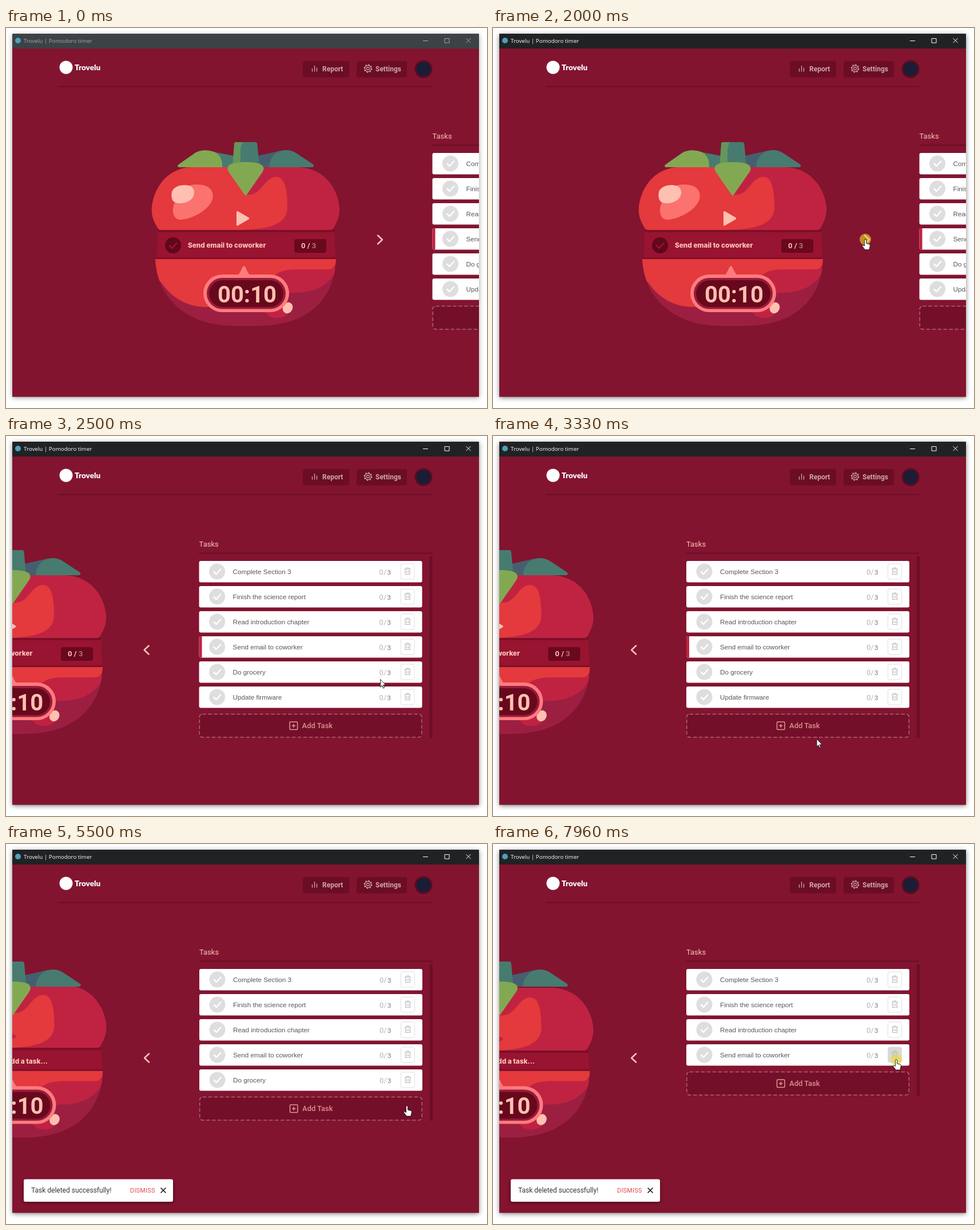
An HTML page for the animation above (8 s loop, 841x666 px).

```html
<!DOCTYPE html>
<html lang="en">
<head>
<meta charset="utf-8">
<title>Pomodoro timer</title>
<style>
  html, body { margin: 0; width: 100%; height: 100%; overflow: hidden; background: #fff; }
  svg { display: block; position: absolute; left: 0; top: 0; }
  text { font-family: Roboto, sans-serif; white-space: pre; }
  .line { fill: none; stroke-linecap: round; stroke-linejoin: round; }
  .dark { fill: #6b0d25; }
  .light { fill: #e4393d; }
  .mid { fill: #c02341; }
  .deep { fill: #9c1f42; }
  .green { fill: #82a952; }
  .teal { fill: #477b70; }
  .cream { fill: #ffc0b2; }
  .pink { fill: #ff7b7e; }
  .label { font-weight: 700; font-size: 12px; fill: #cda5a8; }
  .band { font: 800 11.8px Inter, sans-serif; fill: #ffc4b8; }
  .task { font: 11.7px "Liberation Sans", sans-serif; fill: #58585e; }
</style>
</head>
<body>
<svg width="841" height="666" viewBox="0 0 841 666">
  <defs>
    <clipPath id="page"><rect x="11" y="36" width="816" height="610"/></clipPath>
    <clipPath id="upperClip"><path id="upperShape" d="M271 354Q267 354 265 350C256 335 254 326 255 314C259 276 286 244 326 244H512C554 245 580 279 583 314C584 326 581 337 573 350Q571 354 567 354Z"/></clipPath>
    <clipPath id="lowerClip"><path d="M261 405H577C575 470 533 522 440 522H400C315 522 264 473 261 405Z"/></clipPath>
    <filter id="blur" x="-10%" y="-10%" width="120%" height="120%"><feGaussianBlur stdDeviation="4"/></filter>
    <filter id="soft" x="-10%" y="-40%" width="120%" height="200%"><feGaussianBlur stdDeviation="3"/></filter>
  </defs>

  <rect id="shadow" x="11" y="12" width="816" height="636" filter="url(#blur)"/>
  <rect x="11" y="10" width="816" height="636.5" fill="#821430"/>
  <rect id="bar" x="11" y="10" width="816" height="26"/>
  <circle cx="21" cy="22" r="5" fill="#4f9fb8"/>
  <g id="caption">
    <text x="31" y="26" style="font:9.8px 'Open Sans',sans-serif">Trovelu | Pomodoro timer</text>
    <path d="M729 22.5H738M767 18.5H775V26H767ZM804.500 18L812.500 26M812.500 18L804.500 26" fill="none"/>
  </g>

  <circle cx="105" cy="69" r="11.500" fill="#fff"/>
  <text x="120" y="74" fill="#fff" style="font:900 13.500px Lato,sans-serif">Trovelu</text>
  <rect class="dark" x="93" y="101.500" width="652" height="2"/>
  <rect class="dark" x="519" y="58" width="81" height="28.500" rx="4"/>
  <rect class="dark" x="613" y="58" width="88" height="28.500" rx="4"/>
  <path class="line" stroke="#cda5a8" stroke-width="1.300" d="M535.500 76V71.500M539.500 76V66.500M543.500 76V70"/>
  <g fill="none" stroke="#cda5a8" stroke-width="1.200">
    <circle cx="633" cy="71" r="5.400"/><circle cx="633" cy="71" r="2.400"/>
    <circle cx="633" cy="71" r="6.600" stroke-width="1.600" stroke-dasharray="2.600 2.580"/>
  </g>
  <text class="label" x="553" y="76">Report</text>
  <text class="label" x="646" y="76">Settings</text>
  <circle cx="730" cy="72" r="15.500" fill="#560d22"/>
  <circle cx="730" cy="72" r="12.300" fill="#1b1c35"/>

  <g clip-path="url(#page)">
    <g id="track">
      <path d="M264 346H574L575 382 577 412H261L265 382Z" fill="#981430"/>
      <g id="lower">
        <g clip-path="url(#lowerClip)">
          <rect class="deep" x="250" y="405" width="340" height="120"/>
          <path class="mid" d="M400 420H580C568 447 545 464 505 464H470L495 497C492 510 462 512 456 500L400 480Z"/>
          <path class="light" d="M255 405H577C577 417 573 423 563 423H505C478 424 466 432 460 450L400 489H350C318 489 291 474 272 447L255 430Z"/>
        </g>
        <rect x="262" y="402" width="314" height="3" fill="#7d0f29"/>
        <ellipse class="cream" cx="492.500" cy="490.500" rx="8.500" ry="10" transform="rotate(28 492.500 490.500)"/>
        <path class="pink" d="M404 435Q409 430 413 420Q416 414 419 420Q423 430 428 435Z"/>
        <rect class="pink" x="345" y="432" width="150" height="66" rx="33"/>
        <rect x="351" y="438" width="138" height="54.500" rx="27" fill="#981b3a"/>
        <rect x="355" y="442" width="130" height="47" rx="23.500" fill="#68081c"/>
        <text x="421.500" y="480.500" text-anchor="middle" class="cream" style="font-weight:700;font-size:40px">00:10</text>
      </g>
      <g id="upper">
        <rect x="265" y="352" width="309" height="6" fill="#7d0f29"/>
        <g clip-path="url(#upperClip)">
          <use href="#upperShape" class="mid"/>
          <path class="light" d="M250 240H418L419 292C448 296 450 261 473 261C490 261 492 292 492 314C492 346 456 354 400 354H250Z"/>
        </g>
        <path d="M298 297C303 278 326 272 343 275C360 278 366 291 359 305C350 321 328 333 307 336C293 337 290 323 293 311Z" fill="#fc726e"/>
        <path class="cream" d="M290 287C294 276 311 273 322 277C331 281 331 293 324 300C315 308 299 310 292 303Q288 297 290 287Z"/>
        <path id="play" d="M403 323Q403 320 406 321.500L424 332Q426.500 334 424 335.500L406 346Q403 347.500 403 345Z"/>
      </g>
      <g id="stem">
        <path class="teal" d="M362 217L398 224V244H362Z"/>
        <path class="green" d="M302 244Q298 242 302 239L332 218Q347 211 364 217Q379 224 378 244Z"/>
        <path d="M440 224L480 215V244H440Z" fill="#465f6e"/>
        <path class="teal" d="M460 244C461 228 471 213 492 214Q502 215 510 221L537 239Q540 242 536 244Z"/>
        <path class="teal" d="M402 200H436Q439 200 439.500 204L443 244H396L399 204Q399 200 402 200Z"/>
        <path d="M402 200H414Q410 207 410 216V244H396L399 204Q399 200 402 200Z" fill="#66965b"/>
        <path class="green" d="M388 249C385 239 397 235 419 235S453 239 450 249Q449 252 446 256L421 292Q419 295 417 292L392 256Q389 252 388 249Z"/>
      </g>
      <g id="current">
        <circle cx="292" cy="381" r="14" fill="#61071b"/>
        <path class="line" stroke="#981430" stroke-width="2.500" d="M286 381.500L290.500 386 298.500 377"/>
        <text class="band" x="318" y="385">Send email to coworker</text>
        <rect x="504" y="370" width="56" height="24" rx="4" fill="#6a081d"/>
        <text x="516" y="386" class="cream" style="font-weight:700;font-size:13px">0 / <tspan fill="#b5726f">3</tspan></text>
      </g>
      <text id="empty" class="band" x="480.500" y="385" text-anchor="end">Please add a task...</text>
      <path id="chevron" class="line" stroke="#ffc4b8" stroke-width="2.500" d="M650 363.500L658 371 650 378.500"/>

      <g transform="translate(745.500 0)">
        <text y="194" fill="#fcc3b5" style="font-size:13px">Tasks</text>
        <rect class="dark" y="204.500" width="408" height="2"/>
        <rect id="scroll" class="dark" x="403" y="211" width="5" rx="1"/>
        <g id="rows"></g>
        <g id="add" fill="none">
          <rect x=".75" y="487.500" width="388.500" height="40.500" rx="5" fill="#740f2a" stroke="#aa6476" stroke-width="1.500" stroke-dasharray="6.500 3.500"/>
          <rect x="158.500" y="501" width="13.500" height="13.500" rx="1.500" stroke="#e09a92" stroke-width="1.500"/>
          <path d="M162 507.750H168.500M165.250 504.500V511" stroke="#e09a92" stroke-width="1.500"/>
          <text x="180" y="512" fill="#d98f8b" style="font-size:13px;font-weight:500">Add Task</text>
        </g>
      </g>
    </g>

    <g id="toast">
      <rect x="31" y="591" width="261" height="38" rx="3" fill="#000" opacity=".45" filter="url(#soft)"/>
      <rect x="31" y="587.500" width="261" height="39.500" rx="3" fill="#fff"/>
      <text x="44" y="611" fill="#38383c" style="font-size:12px">Task deleted successfully!</text>
      <text x="217" y="611" fill="#e44650" style="font-size:10.800px;letter-spacing:.3px">DISMISS</text>
      <path class="line" stroke="#111" stroke-width="1.600" d="M271 603L279 611M279 603L271 611"/>
    </g>
  </g>

  <g id="cursor">
    <circle id="press" cx="0" cy="0" r="10" fill="#f0dc28" opacity=".6"/>
    <path id="arrow" d="M0 0V13.500L3 10.700 5.200 15.500 7.200 14.600 5.100 9.900H9.400Z" fill="#fff" stroke="#111" stroke-width=".9"/>
    <path id="beam" d="M-2.500 -6.500H2.500M0 -6.500V6.500M-2.500 6.500H2.500" fill="none" stroke="#7a2a38" stroke-width="1.200"/>
    <path id="hand" d="M-1.600 1.400A1.600 1.600 0 0 1 1.600 1.400V7L6.800 8.200Q8.600 8.800 8.400 10.800L7.400 15.400Q7 17 6.400 18H-.6L-5.400 11.600Q-6 10 -4.400 9.800L-1.600 11.400Z" fill="#fff" stroke="#111" stroke-width=".9"/>
  </g>
</svg>
<script>
const LOOP = 8000;
const ui = Object.fromEntries([...document.querySelectorAll("[id]")].map(el => [el.id, el]));
const set = (el, attrs) => { for (const k in attrs) el.setAttribute(k, attrs[k]); };
const show = (el, on) => set(el, { visibility: on ? "visible" : "hidden" });
const shift = (el, x, y) => set(el, { transform: `translate(${x} ${y})` });

const tasks = ["Complete Section 3", "Finish the science report", "Read introduction chapter",
  "Send email to coworker", "Do grocery", "Update firmware"];
ui.rows.innerHTML = tasks.map((name, i) => `
  <g class="row" transform="translate(0 ${219 + 44 * i})">
    <rect width="390" height="37.500" rx="3" fill="#fff"/>
    ${i === 3 ? '<path id="selected" class="mid" d="M5 0H3Q0 0 0 3V34.500Q0 37.500 3 37.500H5Z"/>' : ""}
    <circle cx="31.500" cy="18.500" r="14" fill="#dedede"/>
    <path class="line" stroke="#fff" stroke-width="2.500" d="M26 19L30 23 37.500 14.500"/>
    <text class="task" x="59" y="23">${name}</text>
    <text x="315" y="23.500" fill="#b5b5b8" style="font-size:13px">0/</text>
    <text x="329" y="23.500" fill="#75757a" style="font-size:11.500px">3</text>
    <rect class="bin" x="352.500" y="5" width="24" height="27" rx="3" stroke="#e0e0e0"/>
    <path class="line" stroke="#b8b8bb" stroke-width="1.100" d="M359.500 14H369.500M362.500 14V12H366.500V14M360.500 14V23.500H368.500V14M363 17V21M366 17V21"/>
  </g>`).join("");
const rows = [...document.querySelectorAll(".row")];
const bins = [...document.querySelectorAll(".bin")];
const selected = document.getElementById("selected");

// time, x, y, pointer shape
const path = [
  [0, 778, 695, "arrow"], [850, 772, 672, "arrow"], [1660, 652, 384, "arrow"],
  [1740, 651, 370, "hand"], [2200, 651, 371, "beam"], [2340, 652, 372, "beam"],
  [2420, 653, 392, "arrow"], [2540, 655, 438, "arrow"], [2780, 620, 490, "hand"],
  [3000, 575, 529, "arrow"], [3150, 566, 538, "arrow"], [3330, 566, 531, "arrow"],
  [3450, 566, 531, "arrow"], [3620, 592, 505, "hand"], [3850, 640, 484, "arrow"],
  [4170, 695, 455, "hand"], [4300, 701, 459, "hand"], [5700, 701, 459, "hand"],
  [6050, 703, 419, "hand"], [6700, 703, 419, "hand"], [7600, 705, 378, "hand"],
  [LOOP, 705, 378, "hand"]
];
const presses = [[1880, 2080], [4820, 4970], [6130, 6270], [7860, LOOP]];
const hovers = [[4230, 4970, 5], [5990, 6270, 4], [7450, LOOP, 3]];
const removals = [4970, 6270];
const slideStart = 2102;

const clamp = v => Math.min(1, Math.max(0, v));
const smooth = v => (v = clamp(v), v * v * (3 - 2 * v));
const within = (t, [from, to]) => t >= from && t < to;

function bezier(x1, y1, x2, y2) {
  const at = (a, b, s) => 3 * (1 - s) ** 2 * s * a + 3 * (1 - s) * s * s * b + s ** 3;
  return x => {
    let lo = 0, hi = 1;
    for (let i = 0; i < 24; i++) {
      const s = (lo + hi) / 2;
      if (at(x1, x2, s) < x) lo = s; else hi = s;
    }
    return at(y1, y2, lo);
  };
}
const outBack = bezier(0.175, 0.885, 0.32, 1.275);

function drawWindow(t) {
  const active = t >= presses[0][0];
  set(ui.bar, { fill: active ? "#202224" : "#3c4246" });
  set(ui.caption, { fill: active ? "#fff" : "#a6a9ab", stroke: "none" });
  set(ui.caption.lastElementChild, { stroke: active ? "#fff" : "#a6a9ab" });
  set(ui.shadow, { fill: "#000", opacity: active ? 0.5 : 0.38 });
}

function drawTomato(t) {
  const shut = smooth((t - 5030) / 250);
  const chew = 3 + 3 * (1 - Math.cos((t - 6590) / 1000 * 2 * Math.PI));
  const empty = t >= 5030;
  shift(ui.stem, 0, 6 * shut);
  shift(ui.upper, 0, chew * shut);
  shift(ui.lower, 0, -7.5 * shut);
  set(ui.play, { fill: empty ? "#c02341" : "#ffbfb0" });
  show(ui.current, !empty);
  show(ui.empty, empty);
}

function drawTasks(t) {
  const slide = t < slideStart ? 0 : outBack(clamp((t - slideStart) / 400));
  const gone = removals.filter(r => t >= r).length;
  const hover = hovers.find(h => within(t, h));
  shift(ui.track, -407.5 * slide, 0);
  set(ui.chevron, { transform: `rotate(${180 * slide} 653.8 373)` });
  rows.forEach((row, i) => set(row, { display: i < tasks.length - gone ? "inline" : "none" }));
  bins.forEach((bin, i) => set(bin, { fill: hover && hover[2] === i ? "#d8d8d8" : "#fff" }));
  show(selected, !gone);
  shift(ui.add, 0, -44 * gone);
  set(ui.scroll, { height: 318 - 44 * gone });
}

function drawToast(t) {
  const start = t < 6290 ? 5060 : 6290;
  const p = smooth((t - start) / 200);
  const s = 0.8 + 0.2 * p;
  set(ui.toast, { opacity: p, transform: `translate(161.5 607) scale(${s}) translate(-161.5 -607)` });
}

function drawCursor(t) {
  const i = path.findLastIndex(k => k[0] <= t);
  const a = path[i], b = path[i + 1] || a;
  const p = a === b ? 0 : smooth((t - a[0]) / (b[0] - a[0]));
  shift(ui.cursor, a[1] + (b[1] - a[1]) * p, a[2] + (b[2] - a[2]) * p);
  for (const kind of ["arrow", "beam", "hand"]) show(ui[kind], kind === a[3]);
  show(ui.press, presses.some(s => within(t, s)));
}

const origin = performance.now();
function frame() {
  const t = (performance.now() - origin) % LOOP;
  for (const draw of [drawWindow, drawTomato, drawTasks, drawToast, drawCursor]) draw(t);
  requestAnimationFrame(frame);
}
frame();
</script>
</body>
</html>
```
